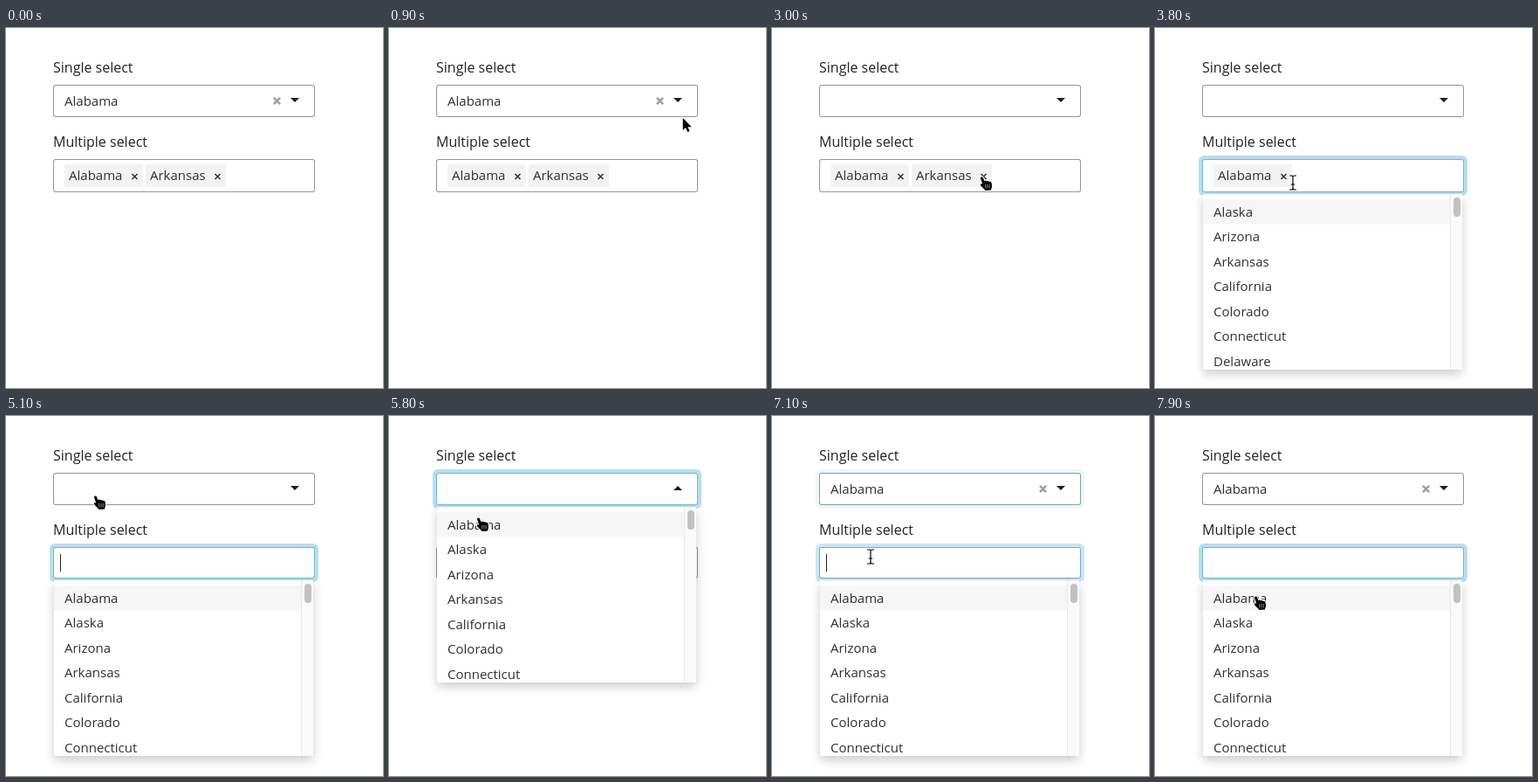
Write an HTML page with a canvas that moves like this. It is 432 px wide and 412 px high and loops after 8 s.

```html
<!DOCTYPE html>
<html lang="en">
<head>
<meta charset="utf-8">
<title>Select boxes</title>
<style>
  html, body { margin: 0; width: 100%; height: 100%; overflow: hidden; background: #fff; }
  canvas { display: block; width: 432px; height: 412px; }
</style>
</head>
<body>
<canvas id="stage"></canvas>
<script>
const W = 432, H = 412, LOOP = 8000, STEP = 100;
const LEFT = 54, WIDTH = 300, SINGLE_TOP = 65, SINGLE_H = 37, MULTI_TOP = 150;
const ROW = 28.5, FADE = 150, BLINK = 500;
const STATES = ['Alabama', 'Alaska', 'Arizona', 'Arkansas', 'California',
  'Colorado', 'Connecticut', 'Delaware', 'Florida'];

// Moments of the clicks
const CLEAR = 1800, DROP_SECOND = 3100, DROP_FIRST = 4200,
  OPEN_SINGLE = 5150, PICK = 6200, OPEN_MULTI = 7000;

// Pointer stops: time, x, y
const STOPS = [
  [300, 416, 157], [1200, 309, 84], [2100, 309, 84], [3000, 241, 171],
  [3400, 241, 171], [3800, 158, 177], [3900, 147, 171], [4500, 147, 171],
  [5100, 103, 92], [5500, 103, 92], [5800, 103, 117], [6000, 103, 118],
  [6300, 103, 118], [6900, 113, 161], [7300, 113, 161], [7900, 116, 207]
];

const HAND = new Path2D('M-2 1.2C-2.2-1 .5-1.2 1 .6L2.3 4.2C3 3.3 4.5 3.4 5 4.5' +
  'C5.8 3.7 7.3 3.9 7.8 5C9 4.4 10.4 5.1 10.6 6.5L11 9.5C11.2 11.5 10.2 12.5 10 14.5' +
  'L3.4 15C2.6 13 .2 12-1.5 9.7C-3.2 7.6-1.5 6.6 0 7.6L.4 7.9Z');
const ARROW = new Path2D('M0 0V14L3.2 11L5.4 16L7.8 15L5.6 10.2H10Z');
const BEAM = new Path2D('M-3.5-8H-1.5Q0-8 0-6.5Q0-8 1.5-8H3.5M0-6.5V6.5' +
  'M-3.5 8H-1.5Q0 8 0 6.5Q0 8 1.5 8H3.5M-1.8 2H1.8');

const canvas = document.getElementById('stage');
const ctx = canvas.getContext('2d');
const ratio = window.devicePixelRatio || 1;
canvas.width = W * ratio;
canvas.height = H * ratio;

const clamp = v => Math.max(0, Math.min(1, v));
const ease = v => v * v * (3 - 2 * v);
const within = (t, a, b) => t >= a && t < b;
const inside = (p, x, y, w, h) => p.x >= x && p.x < x + w && p.y >= y && p.y < y + h;
const focus = (t, on, off) => ease(clamp((t - on) / FADE)) - ease(clamp((t - off) / FADE));

function write(text, x, y, size = 15, color = '#303030') {
  ctx.font = `${size}px "Open Sans", sans-serif`;
  ctx.fillStyle = color;
  ctx.fillText(text, x, y);
}

function box(x, y, w, h, r, color) {
  ctx.fillStyle = color;
  ctx.beginPath();
  ctx.roundRect(x, y, w, h, r);
  ctx.fill();
}

function cross(x, y, r, width, color) {
  ctx.strokeStyle = color;
  ctx.lineWidth = width;
  ctx.beginPath();
  ctx.moveTo(x - r, y - r);
  ctx.lineTo(x + r, y + r);
  ctx.moveTo(x + r, y - r);
  ctx.lineTo(x - r, y + r);
  ctx.stroke();
}

function field(y, h, glow) {
  if (glow > 0) box(LEFT - 4, y - 4, WIDTH + 8, h + 8, 6, `rgba(184,222,239,${glow})`);
  const mix = (a, b) => Math.round(a + (b - a) * glow);
  box(LEFT, y, WIDTH, h, 3, `rgb(${mix(147, 112)},${mix(147, 184)},${mix(156, 220)})`);
  box(LEFT + 1, y + 1, WIDTH - 2, h - 2, 2, '#fff');
}

function chip(name, x, w) {
  box(x, 156, w, 26, 2, '#f2f2f2');
  write(name, x + 5, 174);
  cross(x + w - 9.5, 170, 3, 1.5, '#303030');
}

function caret(x, y, t, start) {
  if ((t - start) % (2 * BLINK) >= BLINK) return;
  ctx.fillStyle = '#222';
  ctx.fillRect(x, y, 1, 20);
}

function menu(bottom, names) {
  const top = bottom + 2, h = 201;
  ctx.save();
  ctx.shadowColor = 'rgba(0,0,0,.2)';
  ctx.shadowBlur = 12 * ratio;
  ctx.shadowOffsetY = 5 * ratio;
  box(55, top, 297, h, [0, 0, 3, 3], '#fff');
  ctx.restore();
  ctx.save();
  ctx.beginPath();
  ctx.rect(55, top, 297, h);
  ctx.clip();
  box(55, bottom + 8, 283, 28.5, 0, '#f6f6f6');
  names.forEach((name, i) => write(name, 67, Math.round(bottom + 27.6 + i * ROW)));
  box(338, top, 14, h, 0, '#fafafa');
  box(338, top, 1, h, 0, '#e8e8e8');
  box(342, bottom + 6, 8, 22, 4, '#c1c1c1');
  ctx.restore();
}

function toggle(open) {
  const d = open ? -1 : 1, y = 82.5;
  ctx.fillStyle = '#1c1c1c';
  ctx.beginPath();
  ctx.moveTo(326, y - 2.5 * d);
  ctx.lineTo(336, y - 2.5 * d);
  ctx.lineTo(331, y + 2.5 * d);
  ctx.fill();
}

function pointerAt(t) {
  const i = STOPS.findIndex(s => s[0] >= t);
  const [t1, x1, y1] = STOPS[i], [t0, x0, y0] = STOPS[i - 1];
  const k = ease((t - t0) / (t1 - t0));
  return { x: x0 + (x1 - x0) * k, y: y0 + (y1 - y0) * k };
}

function outlined(path, inner) {
  ctx.lineJoin = 'round';
  ctx.lineCap = 'round';
  ctx.strokeStyle = '#fff';
  ctx.lineWidth = inner ? 3 : 2;
  ctx.stroke(path);
  if (inner) {
    ctx.strokeStyle = '#000';
    ctx.lineWidth = inner;
    ctx.stroke(path);
  } else {
    ctx.fillStyle = '#000';
    ctx.fill(path);
  }
}

function pointer(p, kind) {
  ctx.save();
  ctx.translate(p.x, p.y);
  if (kind === 'text') outlined(BEAM, 1.2);
  else if (kind === 'arrow') outlined(ARROW);
  else {
    outlined(HAND);
    ctx.strokeStyle = 'rgba(255,255,255,.75)';
    ctx.lineWidth = .7;
    ctx.beginPath();
    for (const x of [3.6, 5.8, 8]) {
      ctx.moveTo(x, 8.2);
      ctx.lineTo(x + .3, 12);
    }
    ctx.stroke();
  }
  ctx.restore();
}

function draw(t) {
  const hasValue = t < CLEAR || t >= PICK;
  const singleOpen = within(t, OPEN_SINGLE, PICK);
  const multiOpen = within(t, DROP_SECOND, OPEN_SINGLE) || t >= OPEN_MULTI;
  const first = t < DROP_FIRST, second = t < DROP_SECOND;
  const multiH = first ? 38 : 36;
  const multiBottom = MULTI_TOP + multiH, singleBottom = SINGLE_TOP + SINGLE_H;

  ctx.setTransform(ratio, 0, 0, ratio, 0, 0);
  ctx.fillStyle = '#fff';
  ctx.fillRect(0, 0, W, H);

  write('Single select', LEFT, 51, 16, '#222');
  write('Multiple select', LEFT, 136, 16, '#222');

  field(SINGLE_TOP, SINGLE_H, focus(t, OPEN_SINGLE, OPEN_MULTI));
  if (hasValue) {
    write('Alabama', 67, 89);
    cross(310.5, 83.5, 3.6, 2.6, '#a0a0a0');
  }
  toggle(singleOpen);

  field(MULTI_TOP, multiH, focus(t, DROP_SECOND, OPEN_SINGLE) + focus(t, OPEN_MULTI, LOOP));
  if (first) chip('Alabama', 67, 90);
  if (second) chip('Arkansas', 160, 92);

  if (singleOpen) {
    caret(67, 74, t, OPEN_SINGLE);
    menu(singleBottom, STATES);
  }
  if (multiOpen) {
    caret(first ? 161 : 62, 158, t, t >= OPEN_MULTI ? OPEN_MULTI : DROP_SECOND);
    menu(multiBottom, first ? STATES.slice(1) : STATES);
  }

  if (t < 400) return;
  const p = pointerAt(t);
  const menuTop = singleOpen ? singleBottom : multiBottom;
  const overMenu = (singleOpen || multiOpen) && inside(p, 55, menuTop + 2, 283, 201);
  const overChip = first && inside(p, 67, 156, 90, 26) || second && inside(p, 160, 156, 92, 26);
  if (overMenu || overChip || inside(p, LEFT, SINGLE_TOP, WIDTH, SINGLE_H)) pointer(p, 'hand');
  else if (inside(p, LEFT, MULTI_TOP, WIDTH, multiH)) pointer(p, 'text');
  else pointer(p, 'arrow');
}

const start = performance.now();
function tick() {
  const t = (performance.now() - start) % LOOP;
  draw(Math.floor(t / STEP) * STEP);
  requestAnimationFrame(tick);
}
tick();
</script>
</body>
</html>
```
